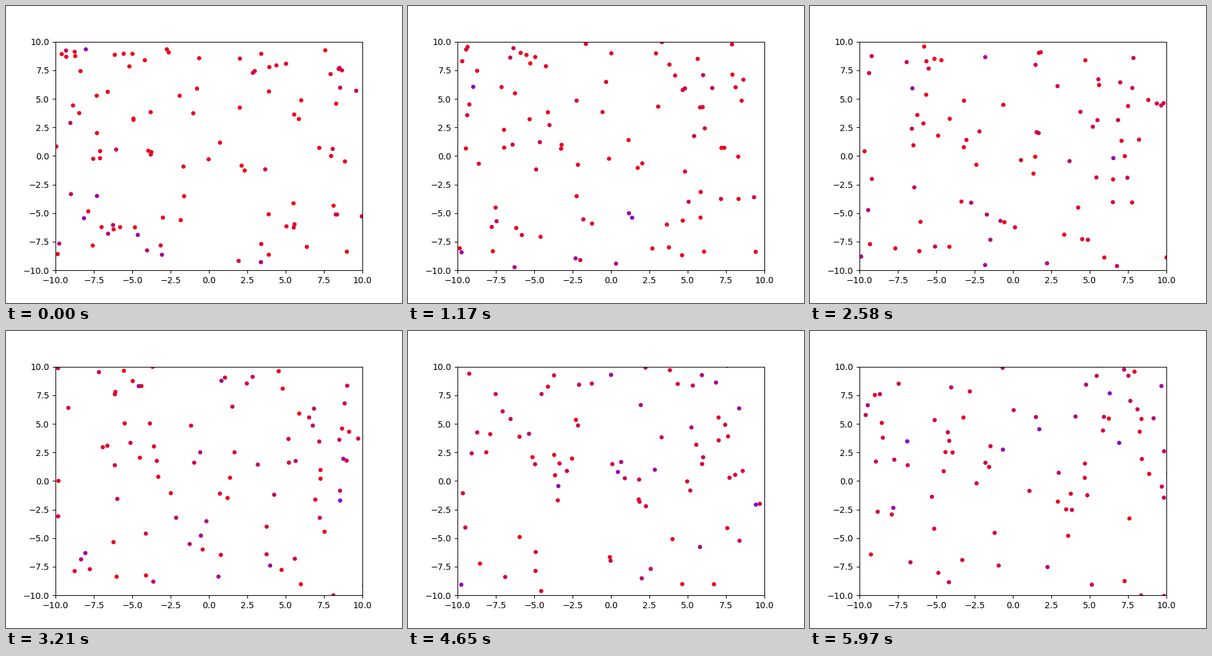
A matplotlib script for the animation above (6000 ms loop, 640x480 px).

```python
import numpy as np
import matplotlib.pyplot as plt
from matplotlib.animation import FuncAnimation

FRAMES, INTERVAL = 200, 30
COUNT = 100
VIEW, WALL = 10.0, 11.2
TOP_SPEED = 0.19
KICK = 0.0026

# Starting places in stage pixels, from slow to fast; the rest are seeded
START = np.array([
    (206, 182), (206, 184), (260, 70), (263, 75), (230, 234), (235, 236),
    (234, 240), (141, 247), (152, 246), (250, 387), (111, 74), (378, 85),
    (437, 96), (543, 104), (419, 264), (376, 412),
    (575, 340), (533, 337), (535, 337), (465, 358), (540, 132), (566, 137),
    (528, 231), (178, 232), (105, 304), (539, 100), (399, 108), (97, 72),
    (104, 189), (86, 384), (228, 395), (173, 354), (165, 368), (412, 414),
    (252, 402), (147, 307), (213, 370), (126, 343), (129, 70),
])


def to_data(px):
    return (px - (328, 242.4)) / (24.8, -18.48)


def simulate():
    """Particles with random kicks that bounce inside a box."""
    rng = np.random.default_rng(12)
    fill = rng.uniform(-VIEW, VIEW, (COUNT - len(START), 2))
    pos = np.vstack([fill, to_data(START)])
    rank = np.linspace(0, 1, COUNT)
    speed = TOP_SPEED * (0.06 + 0.8 * rank ** 6)
    angle = rng.uniform(0, 2 * np.pi, COUNT)
    vel = speed[:, None] * np.column_stack([np.cos(angle), np.sin(angle)])

    places, speeds = [], []
    for _ in range(FRAMES):
        places.append(pos.copy())
        speeds.append(np.hypot(*vel.T))
        vel += rng.normal(0, KICK, vel.shape)
        pos += vel
        out = np.abs(pos) > WALL
        vel[out] = -np.sign(pos[out]) * np.abs(vel[out])
    return places, speeds


def tint(speed):
    """Red when slow, violet when fast."""
    s = np.clip(speed / TOP_SPEED, 0, 1)
    return np.column_stack([0.97 - 0.45 * s, 0 * s, 0.03 + 0.8 * s])


places, speeds = simulate()

fig, ax = plt.subplots(figsize=(6.4, 4.8), dpi=100)
ax.set_xlim(-VIEW, VIEW)
ax.set_ylim(-VIEW, VIEW)
dots = ax.scatter(*places[0].T, s=15, c=tint(speeds[0]))


def update(i):
    dots.set_offsets(places[i])
    dots.set_color(tint(speeds[i]))
    return dots,


anim = FuncAnimation(fig, update, frames=FRAMES, interval=INTERVAL,
                     repeat=True, repeat_delay=0)
plt.show()
```
